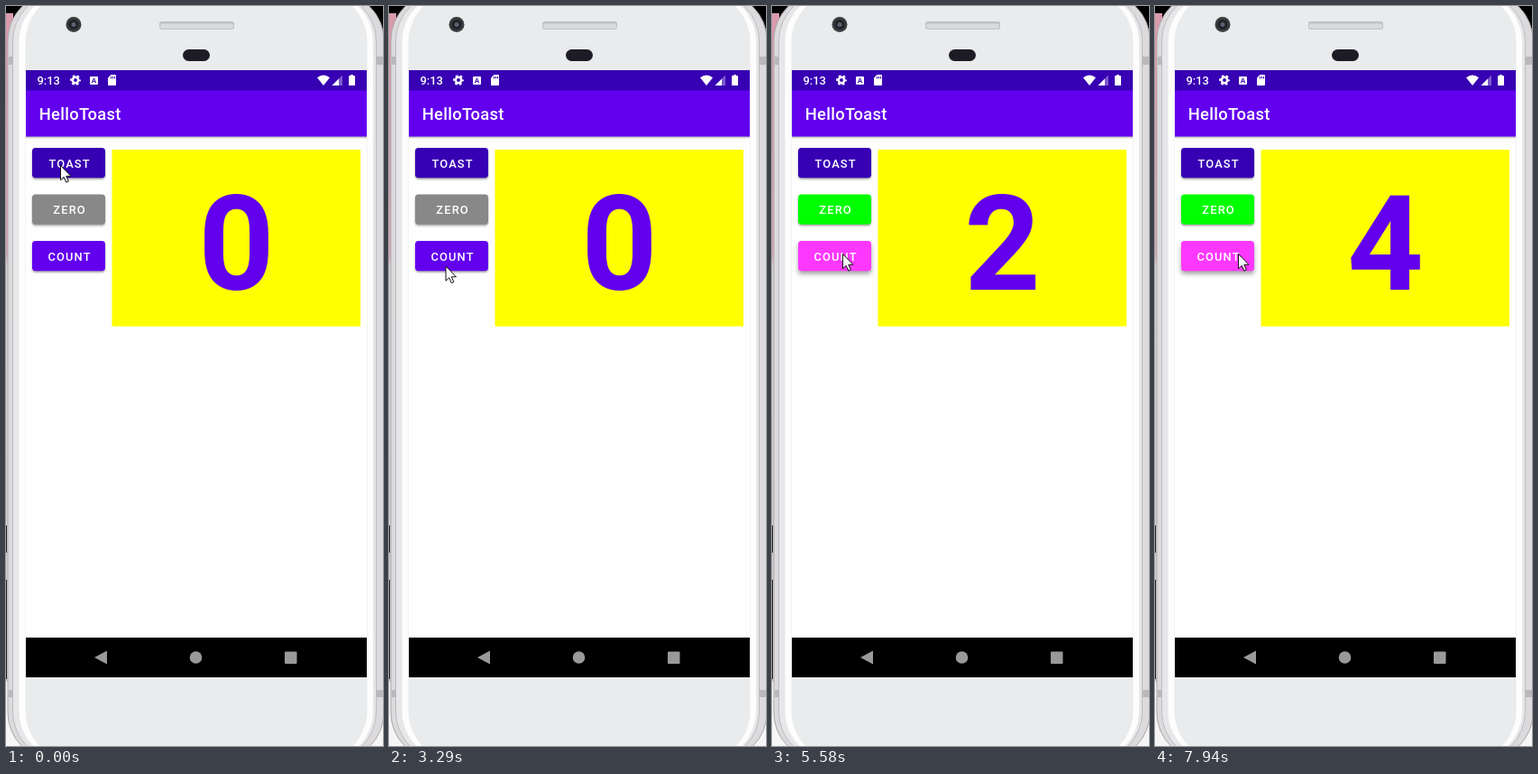
These frames come from a looping animation (418x819 px, 8 s). An HTML page:

```html
<!DOCTYPE html>
<html lang="en">
<head>
<meta charset="utf-8">
<title>HelloToast</title>
<style>
html, body { margin: 0; width: 100%; height: 100%; overflow: hidden; background: #000; }
svg { display: block; width: 418px; height: 819px; }
text { font-family: Roboto, "Noto Sans", sans-serif; }
.label { font-size: 12.87px; font-weight: 500; letter-spacing: 1.15px; fill: #fff; text-anchor: middle; }
.title { font-size: 18.4px; font-weight: 500; letter-spacing: .28px; fill: #fff; }
</style>
</head>
<body>
<svg viewBox="0 0 418 819">
  <defs>
    <filter id="low" x="-20%" y="-40%" width="140%" height="180%"><feGaussianBlur stdDeviation="1"/></filter>
    <filter id="high" x="-20%" y="-40%" width="140%" height="180%"><feGaussianBlur stdDeviation="2.6"/></filter>
    <linearGradient id="fall" x2="0" y2="1">
      <stop stop-color="#000" stop-opacity=".3"/><stop offset="1" stop-color="#000" stop-opacity="0"/>
    </linearGradient>
    <linearGradient id="edge" x2="0" y2="1">
      <stop stop-color="#d99aac"/><stop offset=".36" stop-color="#d9a5b3"/>
      <stop offset=".38" stop-color="#d8d5d7"/><stop offset="1" stop-color="#cfcdd0"/>
    </linearGradient>
  </defs>

  <!-- phone body -->
  <rect y="8" width="8" height="740" fill="url(#edge)"/>
  <path d="M0 575h1v30h-1zM0 635h1v110h-1z" fill="#222"/>
  <rect y="748" width="418" height="71" fill="#f6f6f6"/>
  <rect x="2" y="-14" width="417" height="848" rx="52" fill="#dcdadc" stroke="#aaa6a9"/>
  <rect x="7.5" y="-15" width="403" height="850" rx="54" fill="#e6e7e9" stroke="#bdbabd"/>
  <rect x="14.5" y="-16" width="392.5" height="852" rx="56" fill="#fdfdfd"/>
  <rect x="21.5" y="-16" width="379" height="852" rx="56" fill="#e9ebec"/>
  <path d="M3 56h5v9h-5zM411 56h7v9h-7zM3 757h5v8h-5zM411 757h7v8h-7z" fill="#bab8ba"/>
  <rect x="170" y="17" width="83" height="9" rx="3" fill="#bfc1c4"/>
  <rect x="171" y="19.5" width="81" height="5.5" rx="2.5" fill="#d9dbdd"/>
  <rect x="196" y="48" width="30" height="13" rx="6.5" fill="#1d1c25"/>
  <circle cx="75" cy="20.5" r="8.5" fill="#3b3c40"/>
  <circle cx="75" cy="20.5" r="5.5" fill="#222327"/>
  <circle cx="75" cy="20.5" r="2.5" fill="#596273"/>

  <!-- screen -->
  <rect x="22" y="71" width="378" height="672" fill="#fefefe"/>
  <rect x="22" y="144" width="378" height="3.5" fill="url(#fall)"/>
  <rect x="22" y="71" width="378" height="23" fill="#3700b3"/>
  <rect x="22" y="93.5" width="378" height="51" fill="#6200ee"/>
  <text class="title" x="36.7" y="126">HelloToast</text>

  <!-- status bar -->
  <text x="34.5" y="87" font-size="12.9" font-weight="500" fill="#fff">9:13</text>
  <g fill="none" stroke="#fff">
    <circle cx="77" cy="82" r="3.2" stroke-width="2.5"/>
    <circle cx="77" cy="82" r="5" stroke-width="1.8" stroke-dasharray="2.6 2.636" stroke-dashoffset="1.3"/>
  </g>
  <rect x="93" y="78" width="9" height="9" rx="1" fill="#fff"/>
  <path d="M95.3 85.3L97.5 79.8L99.7 85.3M96 83.6h3" fill="none" stroke="#3700b3"/>
  <path d="M116.500 76H121q1 0 1 1V87q0 1-1 1H114q-1 0-1-1V79.5z" fill="#fff"/>
  <path d="M116.5 78v2.5M118.5 78v2.5M120.5 78v2.5" stroke="#3700b3"/>
  <path d="M352 88L345 79.3Q352 73.5 359 79.3z" fill="#fff"/>
  <path d="M373 76.5V88H361.5z" fill="#fff" opacity=".35"/>
  <path d="M369 80.5V88H361.5z" fill="#fff"/>
  <path d="M382 76h3v1.3h2V88h-7V77.3h2z" fill="#fff"/>

  <!-- counter -->
  <rect x="117.5" y="159" width="275.5" height="195.5" fill="#ff0"/>
  <text id="digit" x="255.5" y="314.4" font-size="147.2" font-weight="700" fill="#6200ee" text-anchor="middle">0</text>

  <g id="buttons"></g>

  <g id="toast" opacity="0">
    <rect x="156" y="632" width="110" height="45" rx="22" fill="#efefef"/>
    <text x="211" y="659" font-size="12.9" fill="#1c1c1c" text-anchor="middle">Hello Toast</text>
  </g>

  <!-- navigation bar -->
  <rect x="22" y="699" width="378" height="44" fill="#000"/>
  <g fill="#999">
    <path d="M98 721L112 713.5V728.5z"/>
    <circle cx="210.5" cy="721" r="6.8"/>
    <rect x="309" y="714.5" width="13.5" height="13.5" rx="1"/>
  </g>

  <path id="cursor" d="M0 0V16.2L3.7 12.8L6.3 18.6L8.8 17.5L6.3 11.8H11.4z" fill="#fff" stroke="#111" stroke-linejoin="round"/>
</svg>
<script>
const LOOP = 8000;
const STEP = 120;
const toastPresses = [670];
const countPresses = [4360, 5460, 6660, 7820];
const stops = [
  [0, 60.5, 176.5], [400, 66, 176], [520, 70.5, 175.5],
  [2750, 35.5, 162.5], [2900, 63, 288], [3440, 59.5, 285.5],
  [4630, 62.5, 285.5], [5030, 78.5, 274.5], [7420, 92.5, 274.5]
];

const $ = id => document.getElementById(id);
const set = (el, attrs) => { for (const k in attrs) el.setAttribute(k, attrs[k]); };

function make(tag, attrs, parent) {
  const el = document.createElementNS('http://www.w3.org/2000/svg', tag);
  set(el, attrs);
  parent.append(el);
  return el;
}

// A ripple grows from the pointer to the whole button, holds, then fades
function ripple(t, presses, hold, strength) {
  const began = presses.findLast(p => p <= t);
  const step = Math.floor((t - began) / STEP);
  if (!(step <= hold)) return { r: 0, alpha: 0, lifted: false };
  const [x] = pointer(began);
  const lifted = step < hold;
  return { x: step ? 70 : x, r: .55 * x + 35 * step, alpha: strength * (lifted ? 1 : .45), lifted };
}

function button(label, row, presses = [], hold = 0, strength = 0) {
  const y = 157 + 51.5 * row;
  const g = make('g', {}, $('buttons'));
  const box = { x: 29, y, width: 81, height: 33.3, rx: 3.7 };
  const clip = make('clipPath', { id: 'clip' + label }, g);
  make('rect', box, clip);
  const shade = make('rect', box, g);
  const face = make('rect', box, g);
  const wave = make('circle', { cy: y + 20, fill: '#fff', 'clip-path': `url(#clip${label})` }, g);
  make('text', { class: 'label', x: 70.6, y: Math.round(y + 21.7) }, g).textContent = label;

  return (t, color) => {
    const { x = 70, r, alpha, lifted } = ripple(t, presses, hold, strength);
    set(face, { fill: color });
    set(wave, { cx: x, r, opacity: alpha });
    set(shade, {
      filter: `url(#${lifted ? 'high' : 'low'})`,
      opacity: .36,
      transform: `translate(0 ${lifted ? 3.3 : 1.4})`
    });
  };
}

const toastButton = button('TOAST', 0, toastPresses, 4, .12);
const zeroButton = button('ZERO', 1);
const countButton = button('COUNT', 2, countPresses, 2, .22);

const pointer = t => stops.findLast(s => s[0] <= t).slice(1);

// Four equal stairs from 0 to 1, the first taken at the start time
const stairs = (t, start) => Math.min(1, Math.max(0, Math.floor((t - start) / 130 + 1) / 4));

function render(t) {
  const n = countPresses.filter(p => t >= p + STEP).length;
  const [x, y] = pointer(t);
  $('digit').textContent = n;
  toastButton(t, '#3700b3');
  zeroButton(t, n ? '#0f0' : '#888');
  countButton(t, !n ? '#6200ee' : n % 2 ? '#00f' : '#f0f');
  set($('toast'), { opacity: stairs(t, 1030) - stairs(t, 2900) });
  set($('cursor'), { transform: `translate(${x} ${y})` });
}

const start = performance.now();
function tick() {
  render((performance.now() - start) % LOOP);
  requestAnimationFrame(tick);
}
tick();
</script>
</body>
</html>
```
